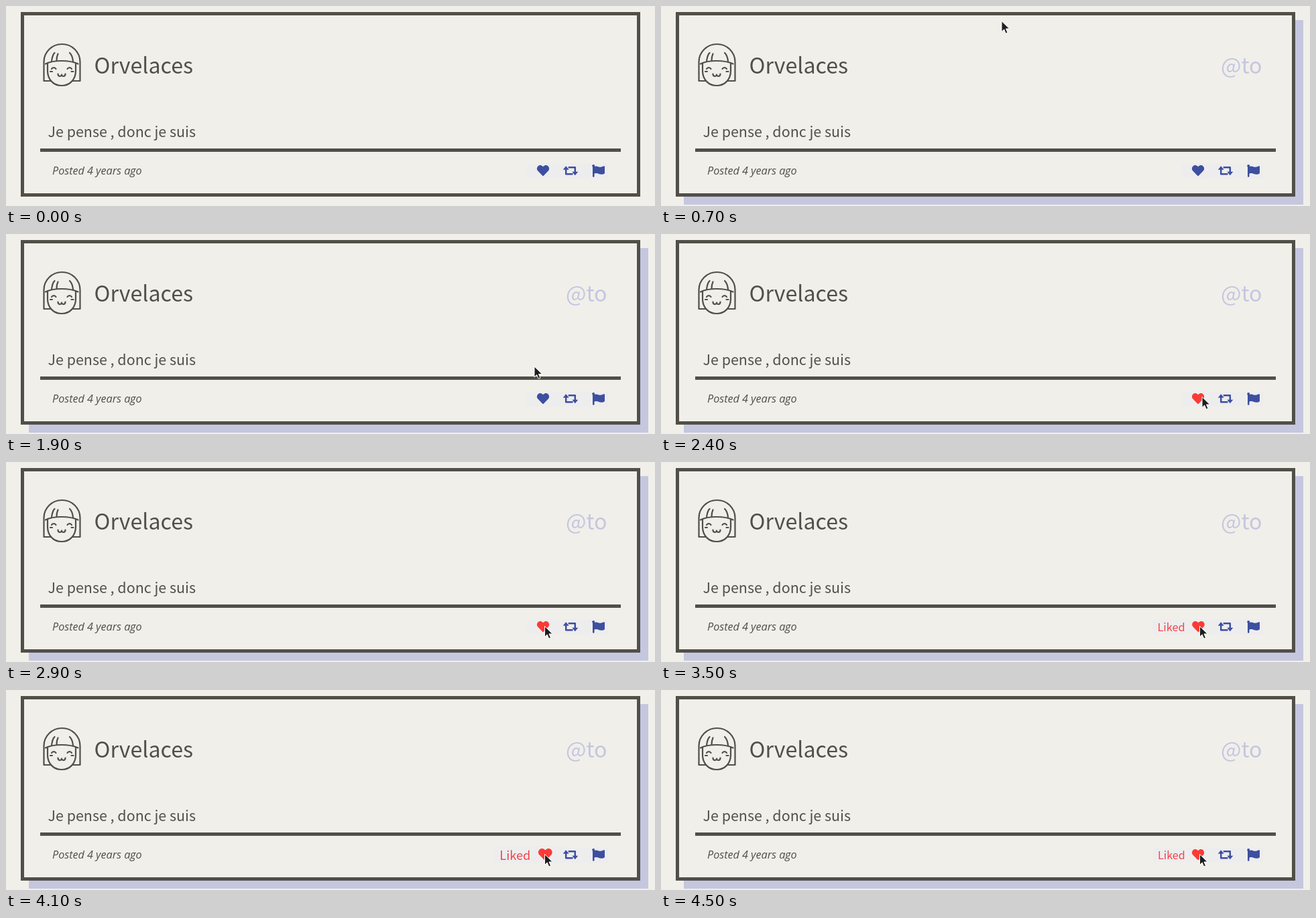
These frames come from a looping animation (968 by 299 pixels, 8 s). An HTML page:

```html
<!DOCTYPE html>
<html lang="fr">
<head>
<meta charset="utf-8">
<title>Post card</title>
<style>
  html, body { margin: 0; width: 100%; height: 100%; overflow: hidden; background: #f1efea; }
  svg { display: block; width: 968px; height: 299px; }
  text { font-family: "Noto Sans CJK JP", "Noto Sans CJK SC", "Noto Sans CJK", "Noto Sans", sans-serif; fill: #524f48; }
  .big { font-size: 32.2px; }
  .body { font-size: 21.45px; }
  .small { font-size: 16.1px; }
  .date { font: italic 16.2px "Open Sans", "Noto Sans", sans-serif; }
  .ink { fill: none; stroke: #524f48; stroke-width: 2.2; stroke-linecap: round; stroke-linejoin: round; }
  .icon { fill: #3d4f9f; }
  .bars { fill: none; stroke: #3d4f9f; stroke-width: 2.5; stroke-linejoin: round; }
</style>
</head>
<body>
<svg viewBox="0 0 968 299">
  <rect width="968" height="299" fill="#f1efea"/>
  <rect id="shadow" x="34" y="21" width="924" height="276" fill="#c5c7df"/>
  <rect x="24.5" y="11.5" width="919" height="271" fill="#f1efea" stroke="#524f48" stroke-width="5"/>

  <g class="ink">
    <path d="M67 112H56.5V83.5a27 26.5 0 0 1 54 0V112H99.5"/>
    <path d="M62 85.5V97c0 13 9 22 21 22s21-9 21-22V85.5"/>
    <path d="M59 86.5C66 83 75 82 83 82s17 1 24.500 4.500"/>
    <path d="M72.500 70c-3 3-4 8-4.500 13M77.500 71.500c-1.500 3-2 6-2 10M95 70c3 3 4.500 7 5 13"/>
    <path d="M68 94c1.500-2.600 5-2.600 6.500 0M91.500 94c1.500-2.600 5-2.600 6.500 0"/>
    <path d="M66 98h3M97.500 98h3M77.500 101.500c0 4.500 5.500 4.500 5.500 1c0 3.500 5.500 3.500 5.500-1"/>
  </g>

  <text class="big" x="131.5" y="101">Orvelaces</text>
  <text class="big" id="handle" x="835" y="101" style="fill:#c5c7df">@to</text>
  <text class="body" x="62.5" y="196">Je pense , donc je suis</text>
  <rect x="51" y="213" width="866" height="5" fill="#524f48"/>
  <text class="date" x="69" y="252">Posted 4 years ago</text>

  <rect x="825" y="235" width="74" height="23" fill="#eeedee"/>
  <g id="like">
    <rect id="pad" y="235" height="23" fill="#eeedee"/>
    <text id="label" class="small" x="741" y="253" style="fill:#f04448">Liked</text>
    <path id="heart" transform="translate(791.9 236.9) scale(.0357)" d="M462.3 62.6C407.5 15.9 326 24.3 275.7 76.2L256 96.5l-19.7-20.3C186.1 24.3 104.5 15.9 49.7 62.6c-62.8 53.6-66.1 149.8-9.9 207.9l193.5 199.8c12.500 12.900 32.800 12.900 45.300 0l193.500-199.800c56.300-58.100 53-154.300-9.800-207.900z"/>
  </g>
  <path class="bars" d="M835.2 243V251.300H845.500M838.700 241.200H848.800V249.500"/>
  <path class="icon" d="M830.700 244.700l4.500-5.400 4.500 5.400zM844.300 247.800h9l-4.500 5.400z"/>
  <circle class="icon" cx="876.2" cy="239" r="2"/>
  <path class="icon" d="M875 239h2.500v16q0 .8-1.200.8t-1.300-.8z"/>
  <path class="icon" d="M877 240.200c4-2.200 7 1.200 10.500.6 1.600-.3 3-.9 4.300-1.500q1.200-.5 1.200.7v9.600q0 .8-.8 1.200c-5.400 3-8.600-1.300-12.400-.8q-1.600.3-2.800.9z"/>

  <path id="cursor" d="M0 0V16l3.700-3.500 2.500 6 2.800-1.200-2.500-5.800h5.200z" fill="#1f1f1f" stroke="#fff" stroke-width="1"/>
</svg>
<script>
const LOOP = 8000, STEP = 100;
const ENTER = 700, HOVER = 2300, CLICK = 3460, PULSE = 1000, PEAK = 1.25;
const $ = id => document.getElementById(id);
const show = (id, on) => $(id).setAttribute("visibility", on ? "visible" : "hidden");

// Pointer moves: start, end, then the position reached
const moves = [
  [600, 700, 508, 22.5],
  [700, 1000, 557, 105],
  [1100, 1400, 651.5, 124.5],
  [1500, 1900, 788, 198],
  [2000, 2400, 807, 243.5],
  [2500, 2700, 804, 246],
  [2800, 2900, 803.5, 245.5]
];

function pointer(t) {
  let [, , x, y] = moves[0];
  for (const [from, to, nx, ny] of moves) {
    if (t <= from) break;
    const p = 1 - Math.pow(1 - Math.min(1, (t - from) / (to - from)), 1.5);
    x += (nx - x) * p;
    y += (ny - y) * p;
  }
  return [x, y];
}

// CSS "ease": cubic-bezier(.25, .1, .25, 1)
function ease(x) {
  const curve = (u, a, b) => 3 * a * u * (1 - u) ** 2 + 3 * b * u * u * (1 - u) + u ** 3;
  let lo = 0, hi = 1;
  for (let i = 0; i < 20; i++) {
    const mid = (lo + hi) / 2;
    if (curve(mid, .25, .25) < x) lo = mid; else hi = mid;
  }
  return curve(lo, .1, 1);
}

function pulse(t) {
  const p = (t - CLICK) / PULSE;
  if (p <= 0 || p >= 1) return 1;
  const e = p < .5 ? ease(p * 2) : 1 - ease(p * 2 - 1);
  return 1 + (PEAK - 1) * e;
}

function draw(ms) {
  const t = Math.floor(ms / STEP) * STEP;
  const inside = t >= ENTER, liked = t >= CLICK;
  show("shadow", inside);
  show("handle", inside);
  show("cursor", inside);
  show("label", liked);

  const left = liked ? 734 : 777;
  $("pad").setAttribute("x", left);
  $("pad").setAttribute("width", 825 - left);
  $("heart").setAttribute("fill", t >= HOVER ? "#fc3a35" : "#3d4f9f");
  $("like").setAttribute("transform", `translate(776 246.5) scale(${pulse(t)}) translate(-776 -246.5)`);
  $("cursor").setAttribute("transform", `translate(${pointer(t)})`);
}

const start = performance.now();
function tick() {
  draw((performance.now() - start) % LOOP);
  requestAnimationFrame(tick);
}
tick();
</script>
</body>
</html>
```
